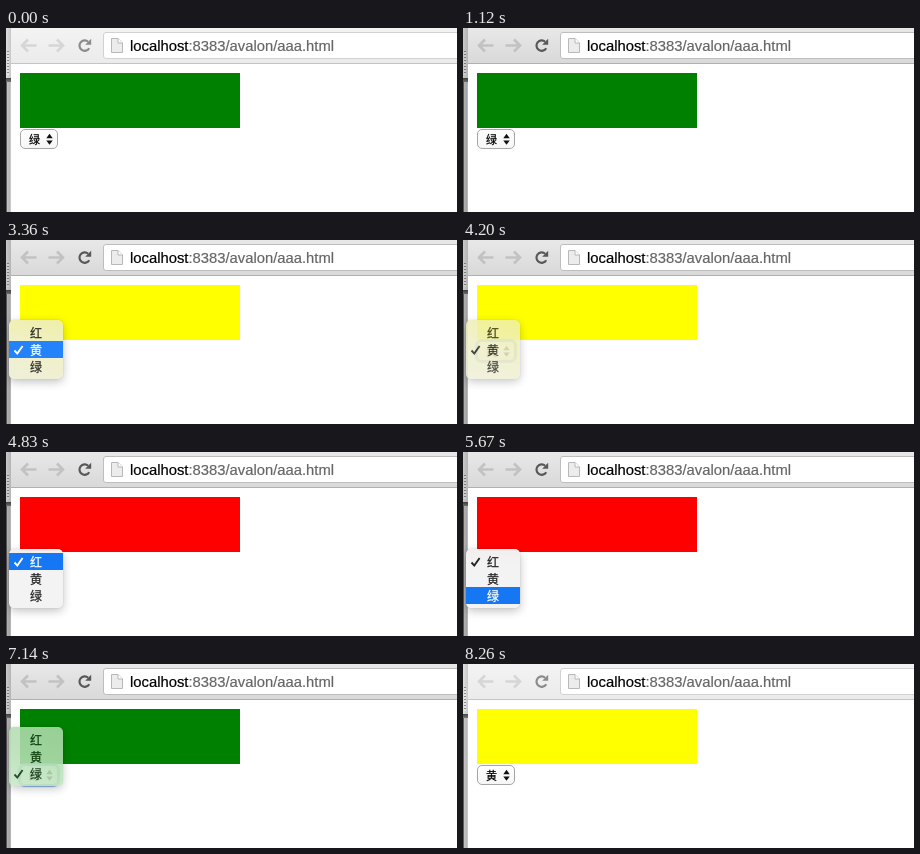
Write an HTML page that moves like this. It is 451 by 184 pixels and loops after 8.33 s.

```html
<!DOCTYPE html>
<html lang="zh">
<head>
<meta charset="utf-8">
<title>Select demo</title>
<style>
html, body { margin: 0; width: 100%; height: 100%; overflow: hidden; background: #fff; }
#stage { position: absolute; left: 0; top: 0; width: 451px; height: 184px; overflow: hidden; background: #fff; }
#stage div, #stage svg, #stage span { position: absolute; box-sizing: border-box; }

/* window behind */
.behind { left: 0; top: 0; width: 5px; height: 184px; background: linear-gradient(90deg, #dedede, #c8c8c8); }
.grip { left: 1px; top: 23px; width: 2px; height: 24px; background: repeating-linear-gradient(#8a8a8a 0 1px, #e4e4e4 1px 3px); }
.bar { left: 0; top: 50px; width: 5px; height: 4px; background: linear-gradient(#444, #777); }
.pane { left: 0; top: 54px; width: 5px; height: 130px; background: linear-gradient(90deg, #5c5c5c 1px, #c4c4c4 1px, #b4b4b4 4px, #c9c9c9 4px); }
.active .behind { filter: brightness(.9); }

/* browser toolbar */
.toolbar { left: 5px; top: 0; width: 446px; height: 36px; background: linear-gradient(#f3f3f3, #ebebeb); border-bottom: 1px solid #c4c4c4; }
.active .toolbar { background: linear-gradient(#e8e8e8, #d9d9d9); border-bottom-color: #b0b0b0; }
.address { left: 97px; top: 4px; width: 370px; height: 27px; background: #fff; border: 1px solid #d2d2d2; border-radius: 3px; }
.active .address { border-color: #bebebe; }
.icons { left: 0; top: 0; }
.arrows { stroke: #d6d6d6; }
.reload { color: #8b8b8b; }
.active .arrows { stroke: #c2c2c2; }
.active .reload { color: #585858; }
.url { left: 124px; top: 9px; font: 14.8px/18px "Liberation Sans", Arial, sans-serif; color: #666; white-space: pre; -webkit-text-stroke: .2px; }
.url b { font-weight: 400; color: #000; }

/* page */
#box { left: 14px; top: 45px; width: 220px; height: 55px; }
#select { left: 14px; top: 101px; width: 38px; height: 20px; border: 1px solid #a6a6a6; border-radius: 5px; background: linear-gradient(#fff, #f6f6f6); }
#select.focus { box-shadow: 0 0 1px 2px rgba(92, 158, 230, .75); }
#value, .row { font-family: "Noto Sans CJK SC", "Noto Sans CJK", sans-serif; -webkit-text-stroke: .25px; }
#value { left: 8px; top: 0; font-size: 11px; line-height: 18px; color: #000; }
#select svg { left: 24px; top: 3px; }

/* popup menu */
#menu { left: 3px; width: 54px; height: 59px; border-radius: 5px; box-shadow: 0 0 1px rgba(0, 0, 0, .3), 0 3px 10px rgba(0, 0, 0, .24); }
.row { left: 0; width: 54px; height: 17px; font-size: 12px; line-height: 17px; padding-left: 21px; }
.row svg { left: 4px; top: 3px; display: none; }
.row.checked svg { display: block; }
#menu .row.hover { color: #fff; background: var(--hover); }
</style>
</head>
<body>
<div id="stage">
  <div class="behind"><div class="grip"></div><div class="bar"></div><div class="pane"></div></div>
  <div class="toolbar"></div>
  <div class="address"></div>
  <svg class="icons" width="122" height="36" fill="none">
    <g class="arrows" stroke-width="2.6">
      <path d="M30.5 17.5H16.5M22 11.5L16 17.5L22 23.5"/>
      <path d="M42.5 17.5H56.5M51 11.5L57 17.5L51 23.5"/>
    </g>
    <g class="reload">
      <path d="M83.2 20.2A5.2 5.2 0 1 1 82.2 13.8" stroke="currentColor" stroke-width="2.2"/>
      <path d="M85.2 10.8V16.8H79.2Z" fill="currentColor"/>
    </g>
    <path d="M105.5 10.5H112L116.5 15V24.5H105.5Z" fill="#ececec" stroke="#b8b8b8"/>
    <path d="M112 10.5V15H116.5" fill="#fff" stroke="#b8b8b8"/>
  </svg>
  <div class="url"><b>localhost</b>:8383/avalon/aaa.html</div>
  <div id="box"></div>
  <div id="select">
    <span id="value"></span>
    <svg width="9" height="13"><path d="M1.3 5.2L4.5 .8L7.7 5.2ZM1.3 7.4L4.5 11.8L7.7 7.4Z" fill="#111"/></svg>
  </div>
  <div id="menu"></div>
</div>
<script>
const $ = id => document.getElementById(id);
const LOOP = 8330, NONE = -1;
const labels = ['红', '黄', '绿'];
const colors = ['#f00', '#ff0', '#008000'];
// menu tint, highlight and ink over each box colour
const themes = [
  { bg: 'linear-gradient(#f3eeee, #f3f3f3 30%)', hover: '#1577f3', ink: '#262626' },
  { bg: 'linear-gradient(195deg, #efefa8, #f0f0c8 50%, #efefdc)', hover: '#2482fb', ink: '#303028' },
  { bg: 'linear-gradient(195deg, #aedcac, #b7e1b5 55%, #c8e8c8)', hover: '#0562da', ink: '#123812' }
];

const rows = labels.map((label, i) => {
  const row = document.createElement('div');
  row.className = 'row';
  row.style.top = 4 + 17 * i + 'px';
  row.innerHTML = '<svg width="12" height="12"><path d="M1.5 6.5L4.3 9.6L9.6 2" fill="none" stroke="currentColor" stroke-width="1.9"/></svg>' + label;
  $('menu').append(row);
  return row;
});

const steps = [];
const at = (time, change) => steps.push([time, change]);
const hover = (time, row) => at(time, { hover: row });
const open = (time, row) => at(time, { menu: 1, hover: row, focus: true });
// the chosen row blinks, then the menu fades away
const choose = (time, row, changeAt) => {
  hover(time, NONE);
  hover(time + 70, row);
  at(time + 140, { hover: NONE, menu: .87 });
  at(time + 210, { menu: .4 });
  at(time + 280, { menu: 0 });
  at(changeAt, { value: row });
};

at(0, { active: false, focus: false, value: 2, menu: 0, hover: NONE });
at(1050, { active: true });
open(1820, 2);
hover(2100, NONE);
hover(2240, 2);
hover(2310, 1);
choose(2660, 1, 3080);
open(3360, 1);
hover(3640, 0);
choose(4060, 0, 4410);
open(4830, 0);
hover(5040, 1);
hover(5180, 2);
choose(5600, 2, 5880);
open(6160, 2);
hover(6510, NONE);
hover(6580, 2);
hover(6650, 1);
choose(7000, 1, 7420);
at(8260, { active: false, focus: false });

function render(time) {
  const s = {};
  for (const [start, change] of steps) if (start <= time) Object.assign(s, change);
  const theme = themes[s.value], menu = $('menu').style;
  $('stage').className = s.active ? 'active' : '';
  $('box').style.background = colors[s.value];
  $('value').textContent = labels[s.value];
  $('select').className = s.focus ? 'focus' : '';
  menu.opacity = s.menu;
  menu.top = 97 - 17 * s.value + 'px';
  menu.background = theme.bg;
  menu.color = theme.ink;
  menu.setProperty('--hover', theme.hover);
  rows.forEach((row, i) => {
    row.classList.toggle('checked', i === s.value);
    row.classList.toggle('hover', i === s.hover);
  });
}

const begin = performance.now();
function tick() {
  render((performance.now() - begin) % LOOP);
  requestAnimationFrame(tick);
}
tick();
</script>
</body>
</html>
```
